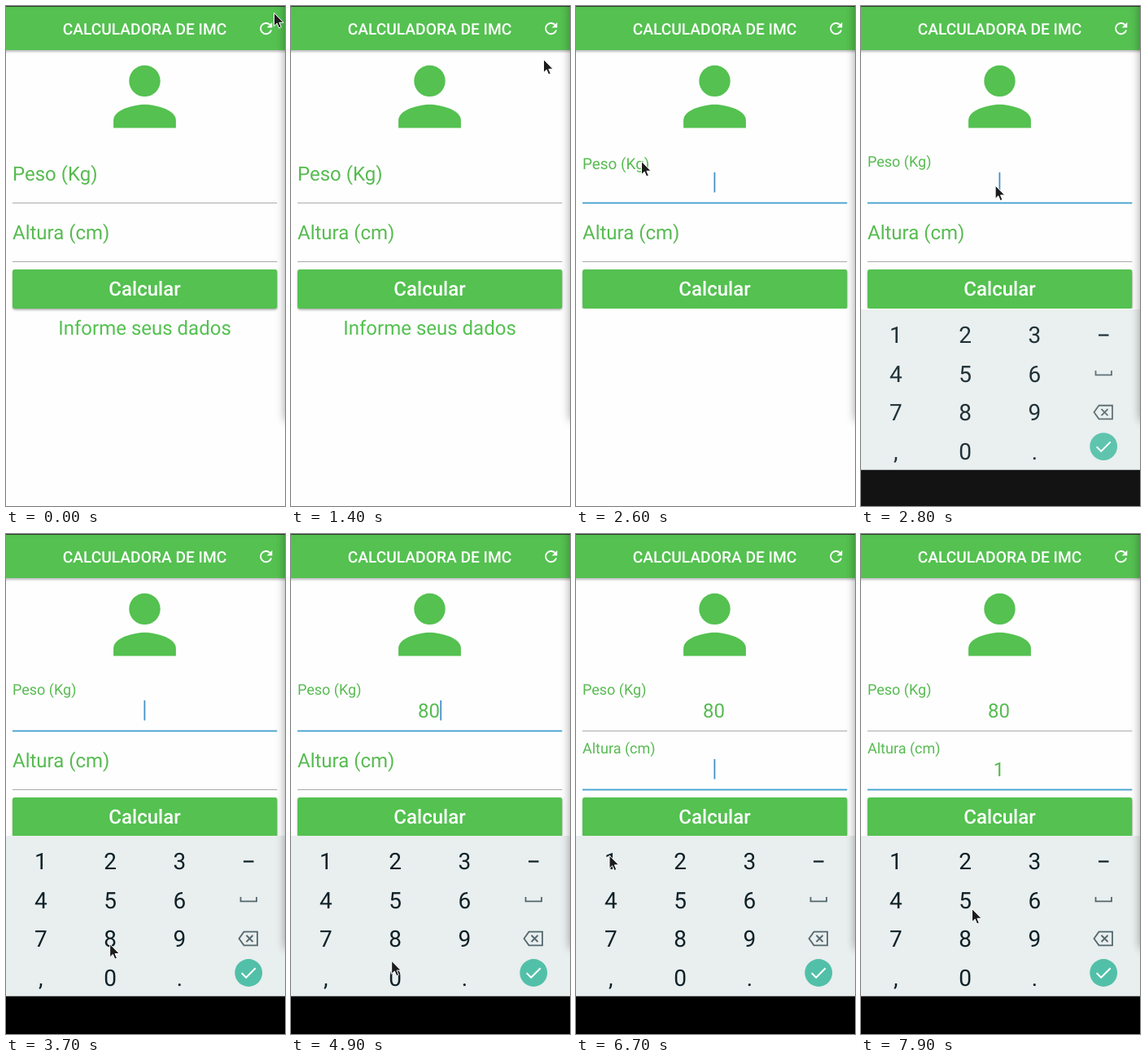
Write an HTML page that moves like this. It is 343 by 613 pixels and loops after 8000 ms.

```html
<!DOCTYPE html>
<html lang="pt">
<head>
<meta charset="utf-8">
<title>Calculadora de IMC</title>
<style>
  html, body { margin: 0; width: 100%; height: 100%; overflow: hidden; background: #fefefe; }
  svg { display: block; width: 343px; height: 613px; font-family: Roboto, sans-serif; text-rendering: geometricPrecision; }
  .green { fill: #54c150; }
  .label, .value, .big { font-size: 24px; }
  .label, .value { fill: #57bb51; }
  .mid, .value { text-anchor: middle; }
  .white { fill: #fff; font-weight: 500; }
  #digits { font-size: 28px; fill: #0e2128; }
  .icon { fill: none; stroke: #53676d; stroke-width: 1.8; }
</style>
</head>
<body>
<svg viewBox="0 0 343 613">
  <defs>
    <filter id="soft" x="-20%" y="-50%" width="140%" height="200%"><feGaussianBlur stdDeviation="1.6"/></filter>
    <filter id="wide" x="-50%" y="-10%" width="200%" height="120%"><feGaussianBlur stdDeviation="6"/></filter>
  </defs>
  <rect width="343" height="613" fill="#fefefe"/>

  <rect x="-10" y="20" width="363" height="36" opacity=".28" filter="url(#soft)"/>
  <rect class="green" width="343" height="54"/>
  <rect width="343" height="1" fill="#2b3a2b"/>
  <text class="mid white" x="170.5" y="35" font-size="19.2">CALCULADORA DE IMC</text>
  <g transform="translate(319.7 27.6)">
    <path d="M6.4 1.9A6.65 6.65 0 1 1 4.7-4.7" fill="none" stroke="#fff" stroke-width="1.9"/>
    <path d="M1-1h6.6v-6.6z" fill="#fff"/>
  </g>
  <circle class="green" cx="170.5" cy="91.9" r="19.2"/>
  <path class="green" d="M132.1 149.6v-9.6c0-12.8 25.6-19.2 38.4-19.2s38.4 6.4 38.4 19.2v9.6z"/>

  <g id="fields"></g>

  <rect x="8.5" y="325" width="324.5" height="47.2" rx="2" opacity=".4" filter="url(#soft)"/>
  <text class="green big mid" x="170.5" y="403.3">Informe seus dados</text>
  <rect class="green" x="8" y="323" width="325.3" height="48" rx="2.5"/>
  <text class="mid white big" x="170.5" y="355">Calcular</text>
  <rect id="cover" y="371" width="343" height="242" fill="#fefefe"/>

  <g id="keyboard">
    <rect y="370" width="343" height="198" fill="#e9eeee"/>
    <rect y="566.7" width="343" height="60"/>
    <g id="digits" class="mid"></g>
    <rect x="292" y="400.4" width="12.5" height="2.2" fill="#0e2128"/>
    <path class="icon" d="M288.5 444.9v5.5h19.5v-5.5"/>
    <path class="icon" d="M286.5 496l6-8.3h16.5v16.6h-16.5zM295.5 492l8 8m0-8l-8 8"/>
    <circle cx="298.2" cy="538" r="16.9" fill="#52c0a8"/>
    <path d="M289.7 538.3l5.5 5.5 11.5-11.5" fill="none" stroke="#fff" stroke-width="2"/>
  </g>

  <rect x="343" y="-60" width="60" height="568" opacity=".36" filter="url(#wide)"/>
  <path id="pointer" fill="#1c1c1c" stroke="#fff" d="M0 0v16.2l3.7-3.5 2.4 5.8 2.7-1.1-2.4-5.6h5.2z"/>
</svg>
<script>
const LOOP = 8000, STEP = 100;
const $ = id => document.getElementById(id);

// Pointer moves from rest to rest; a bend pulls the way into a curve
const home = [329.5, 8.5];
const moves = [
  { from: 500, to: 600, end: [320, 37] },
  { from: 800, to: 900, end: [319, 46] },
  { from: 1300, to: 1400, end: [310.5, 65.5] },
  { from: 1400, to: 2200, end: [80.5, 190.5], bend: [190, 383] },
  { from: 2600, to: 3100, end: [221, 440], bend: [210, 169] },
  { from: 3200, to: 3700, end: [127.7, 502.7] },
  { from: 3800, to: 4400, end: [124, 562] },
  { from: 4800, to: 5500, end: [121.6, 290.6] },
  { from: 5800, to: 6400, end: [55, 386] },
  { from: 6500, to: 6700, end: [41, 394] },
  { from: 7000, to: 7500, end: [111, 444], bend: [-58, 419] },
  { from: 7600, to: 7900, end: [136.5, 459.5] }
];

const fields = [
  { name: 'Peso (Kg)', y: 241, tap: 2500, floatAt: 2460, text: '80', keyTimes: [3900, 4900] },
  { name: 'Altura (cm)', y: 313, tap: 5700, floatAt: 5800, text: '1', keyTimes: [7200] }
];
const caretResets = fields.flatMap(f => [f.tap, ...f.keyTimes]);

$('fields').innerHTML = fields.map(({ name, y }) => `<g>
  <text class="label">${name}</text>
  <text class="value" x="169.5" y="${y - 16.5}"></text>
  <rect x="8" width="325.3"/>
  <rect y="${y - 37}" width="1.8" height="24.5" fill="#4591c6"/></g>`).join('');
fields.forEach((field, i) => {
  [field.label, field.value, field.line, field.bar] = $('fields').children[i].children;
});

$('digits').innerHTML = ['123', '456', '789', ',0.'].map((row, r) =>
  [...row].map((key, c) => `<text x="${42.8 + 85.3 * c}" y="${411.2 + 47.5 * r}">${key}</text>`).join('')).join('');

const show = (el, on) => el.setAttribute('visibility', on ? 'visible' : 'hidden');
const clamp = u => Math.min(1, Math.max(0, u));
const easeOut = u => 1 - (1 - clamp(u)) ** 3;
const mix = (a, b, u) => a.map((v, i) => v + (b[i] - v) * u);

function pointerAt(t) {
  return moves.filter(m => m.from <= t).reduce((start, { from, to, end, bend }) => {
    const u = clamp((t - from) / (to - from));
    return bend ? mix(mix(start, bend, u), mix(bend, end, u), u) : mix(start, end, u);
  }, home);
}

function drawField(f, t, active, caret) {
  const p = easeOut((t - f.floatAt) / 300);
  f.label.setAttribute('transform', `translate(8 ${f.y - 27.4 - 16.2 * p}) scale(${1 - .25 * p})`);
  const text = f.text.slice(0, f.keyTimes.filter(at => at <= t).length);
  f.value.textContent = text;
  f.line.setAttribute('y', active ? f.y - .4 : f.y);
  f.line.setAttribute('height', active ? 1.8 : 1);
  f.line.setAttribute('fill', active ? '#419fcd' : '#a9aaa9');
  f.bar.setAttribute('x', 169.5 + text.length * 6.9);
  show(f.bar, caret);
}

function draw(t) {
  const reset = caretResets.findLast(at => at <= t);
  const blink = Math.floor((t - reset) / 500) % 2 === 0;
  const tapped = fields.findLast(f => f.tap <= t);
  const active = fields.findLast(f => f.floatAt + 90 <= t);
  fields.forEach(f => drawField(f, t, f === active, f === tapped && blink));

  show($('cover'), t >= 2600);
  const up = easeOut((t - 2600) / 350);
  $('keyboard').setAttribute('opacity', up);
  $('keyboard').setAttribute('transform', `translate(0 ${(1 - up) * 26})`);
  $('pointer').setAttribute('transform', `translate(${pointerAt(t)})`);
}

const start = performance.now();
function tick() {
  const t = (performance.now() - start) % LOOP;
  draw(Math.floor(t / STEP) * STEP);
  requestAnimationFrame(tick);
}
tick();
</script>
</body>
</html>
```
